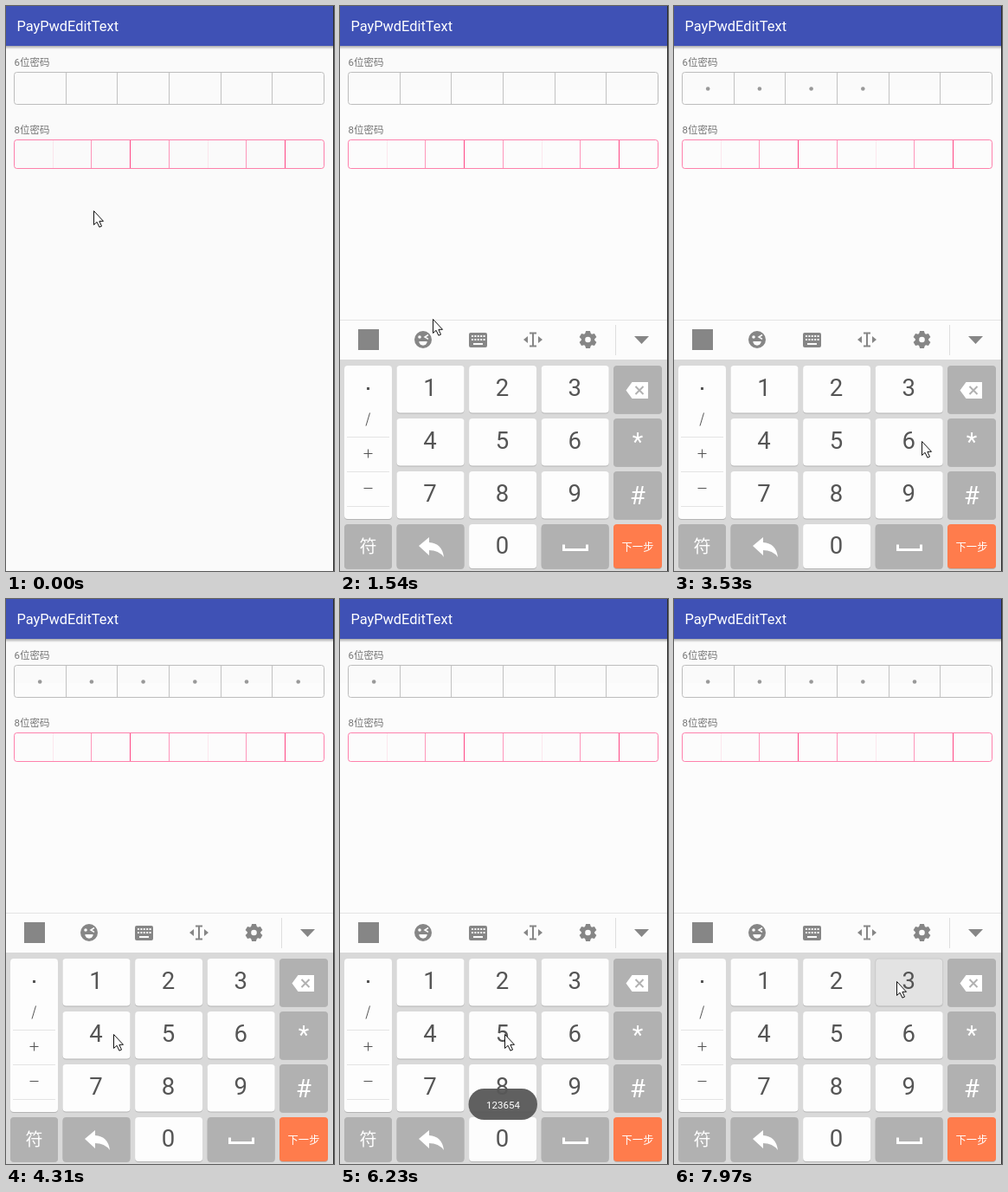
Recreate the animation shown at these times as an HTML page with a canvas. Size 379 by 652 pixels, loop 8 s.

```html
<!DOCTYPE html>
<html lang="zh">
<head>
<meta charset="utf-8">
<title>PayPwdEditText</title>
<style>
html, body { margin: 0; width: 100%; height: 100%; overflow: hidden; background: #fafafa; }
canvas { display: block; width: 379px; height: 652px; }
</style>
</head>
<body>
<canvas id="stage"></canvas>
<script>
const W = 379, H = 652, LOOP = 8000, HOLD = 60, KEYBOARD_IN = 1090;
const canvas = document.getElementById('stage');
const c = canvas.getContext('2d');
const dpr = window.devicePixelRatio || 1;
canvas.width = W * dpr;
canvas.height = H * dpr;

const FONT = 'Roboto, "Noto Sans CJK SC", "Noto Sans CJK", sans-serif';
const ICON = '#868686', PAPER = '#fcfcfc', GRAY = '#b1b1b1', WHITE = '#fdfdfd', INK = '#555';
const DELETE = '<';

const clamp = v => Math.max(0, Math.min(1, v));
const ramp = (t, a, b) => clamp((t - a) / (b - a));
const ease = p => p * p * (3 - 2 * p);

const colX = col => 65.5 + col * 83.6;
const rowY = row => 415 + row * 61;

// Centre of a key
function keyCentre(key) {
  if (key === DELETE) return [344, 441];
  const i = key - 1;
  return [colX(i % 3) + 38.5, rowY(Math.floor(i / 3)) + 26];
}

// Evenly paced runs of taps
const run = (start, gap, keys) => [...keys].map((key, i) => ({ key, time: start + i * gap }));
const taps = [
  ...run(2050, 280, '12'),
  ...run(3050, 400, '3654'),
  ...run(4880, 230, DELETE.repeat(5)),
  ...run(6560, 352, '52413')
];

// The hand drifts sideways from the key centres
const drift = t => 20 * Math.cos((t - 4250) / 1600);

const stops = [
  { x: 101, y: 236, leave: 150 },
  { x: 41, y: 98, leave: KEYBOARD_IN },
  { x: 107, y: 361, leave: 1570 },
  ...taps.map(({ key, time }) => {
    const [x, y] = keyCentre(key);
    return { x: x + drift(time), y, leave: time + HOLD };
  })
];

function pointerAt(t) {
  const next = stops.findIndex(s => t < s.leave);
  const to = stops[next < 0 ? stops.length - 1 : next];
  const from = next > 0 ? stops[next - 1] : to;
  const dx = to.x - from.x, dy = to.y - from.y;
  const travel = 120 + 1.1 * Math.hypot(dx, dy);
  const p = ease(ramp(t, from.leave, from.leave + travel));
  return [from.x + dx * p, from.y + dy * p];
}

const countAt = t => taps
  .filter(tap => t >= tap.time + HOLD)
  .reduce((n, tap) => n + (tap.key === DELETE ? -1 : 1), 0);

function heldAt(t) {
  const tap = taps.find(({ time }) => t >= time && t < time + HOLD);
  return tap ? tap.key : '';
}

function rect(x, y, w, h, fill) {
  c.fillStyle = fill;
  c.fillRect(x, y, w, h);
}

function round(x, y, w, h, r, fill) {
  c.beginPath();
  c.roundRect(x, y, w, h, r);
  if (fill) {
    c.fillStyle = fill;
    c.fill();
  }
}

function outline(color) {
  c.strokeStyle = color;
  c.lineWidth = 1;
  c.stroke();
}

function disc(x, y, r, fill, end = Math.PI * 2) {
  c.beginPath();
  c.arc(x, y, r, 0, end);
  c.fillStyle = fill;
  c.fill();
}

function shape(d, fill) {
  c.fillStyle = fill;
  c.fill(new Path2D(d));
}

function stroke(d, color, width) {
  c.strokeStyle = color;
  c.lineWidth = width;
  c.stroke(new Path2D(d));
}

function text(str, x, y, size, color, align = 'center') {
  c.font = `${size}px ${FONT}`;
  c.textAlign = align;
  c.fillStyle = color;
  c.fillText(str, x, y);
}

const pink = alpha => `rgba(255,64,129,${alpha})`;

function drawField(y, h, cells, border, divider) {
  for (let i = 1; i < cells; i++)
    rect(Math.floor(9.4 + i * 358 / cells), y + 1, 1, h - 1, divider(i));
  round(9.5, y + .5, 358, h, 3);
  outline(border);
}

function drawPage(t) {
  rect(0, 0, W, H, '#fafafa');
  if (t >= KEYBOARD_IN) rect(0, 97, W, H - 97, PAPER);
  const shadow = c.createLinearGradient(0, 46, 0, 50);
  shadow.addColorStop(0, 'rgba(0,0,0,.32)');
  shadow.addColorStop(1, 'rgba(0,0,0,0)');
  rect(0, 46, W, 4, shadow);
  rect(0, 0, W, 46, '#3f51b5');
  text('PayPwdEditText', 12.4, 29, 16.4, '#fff', 'left');

  text('6位密码', 9.5, 69, 11.5, '#757575', 'left');
  drawField(76, 37, 6, '#bdbdbd', () => '#c2c2c2');
  for (let i = 0; i < countAt(t); i++) disc(39.2 + i * 59.7, 95.5, 2.3, '#999');

  text('8位密码', 9.5, 147, 11.5, '#757575', 'left');
  drawField(154, 33, 8, pink(.65), i => pink(.54 - .43 * Math.sin(i * Math.PI / 2)));
}

function drawKey(x, y, w, h, fill, pressed) {
  round(x, y + 1, w, h, 4, '#b4b4b4');
  round(x, y, w, h, 4, fill);
  if (pressed) outline('#cacaca');
}

function drawToolbar() {
  rect(0, 362, W, 46, PAPER);
  rect(0, 362, W, 1, '#e4e4e4');
  rect(21, 373, 24, 24, ICON);

  disc(96, 385, 10, ICON);
  disc(92, 382, 1.8, PAPER);
  stroke('M102 379.5l-4 2.5 4 2.3', PAPER, 1.5);
  disc(96, 387, 4.7, PAPER, Math.PI);

  round(149, 377, 21, 17, 2, ICON);
  for (let i = 0; i < 10; i++)
    rect(152 + i % 5 * 3.4, 380 + Math.floor(i / 5) * 4, 2, 2, PAPER);
  rect(154, 389, 11, 2, PAPER);

  stroke('M219 377.5h8M219 392.5h8M223 377.5v15', ICON, 2);
  shape('M212 385l5-4v8zM234 385l-5-4v8z', ICON);

  for (let i = 0; i < 6; i++) {
    c.save();
    c.translate(286.5, 385);
    c.rotate(i * Math.PI / 3);
    shape('M-3.6-6L-2.4-10H2.4L3.6-6z', ICON);
    c.restore();
  }
  disc(286.5, 385, 7.7, ICON);
  disc(286.5, 385, 3.3, PAPER);

  rect(318, 368, 1, 35, '#dedede');
  shape('M340 381h17l-8.5 9z', ICON);
}

function drawDigit(n, x, y, h, held) {
  const down = held === n;
  drawKey(x, y, 78, h, down ? '#e3e3e3' : WHITE, down);
  text(n, x + 38.5, y + 35 - (54.5 - h) * .3, 27.5, INK);
}

function drawKeyboard(t) {
  const held = heldAt(t);
  rect(0, 408, W, 244, '#d9d9d9');
  drawToolbar();

  drawKey(5, 415, 55, 177, WHITE);
  for (let y = 497; y < 580; y += 40) rect(8, y, 49, 1, '#e4e4e4');
  rect(31, 440, 3, 3, INK);
  stroke('M34.5 469.5l-4.5 15M27.5 516.5h10M32.5 511.5v10M27.5 556.5h10', INK, 1);

  for (let i = 0; i < 9; i++)
    drawDigit(String(i + 1), colX(i % 3), rowY(Math.floor(i / 3)), 54.5, held);
  drawDigit('0', colX(1), 598, 51, held);

  for (let row = 0; row < 3; row++)
    drawKey(316, rowY(row), 56, 55, row === 0 && held === DELETE ? '#999' : GRAY);
  shape('M330.5 443.5l7-9.5H356v19h-18.5z', '#fff');
  stroke('M341.5 439l9 9M350.5 439l-9 9', GRAY, 2);
  text('*', 344, 513, 29, '#fff');
  text('#', 344, 575, 29, '#fff');

  drawKey(5, 598, 55, 51, GRAY);
  text('符', 32.5, 631, 20, '#fff');
  drawKey(colX(0), 598, 78, 51, GRAY);
  shape('M91 623L103 613V619Q118 620 120 636Q114 628 103 628V634Z', '#fff');
  drawKey(colX(2), 598, 78, 51, GRAY);
  stroke('M258.5 621.5v6h27v-6', '#fff', 3);
  drawKey(316, 598, 56, 51, '#ff7c4c');
  text('下一步', 344, 628.5, 12.3, '#fff');
}

function drawToast(t) {
  c.globalAlpha = ramp(t, 4370, 4780) * (1 - ramp(t, 6350, 6830));
  round(148.5, 565, 79.5, 36, 18, 'rgba(88,88,88,.95)');
  text('123654', 188.5, 588, 11.5, '#fff');
  c.globalAlpha = 1;
}

function drawPointer(t) {
  const [x, y] = pointerAt(t).map(Math.round);
  const arrow = 'M0 0V16L3.6 12.8L6.4 18.7L9 17.6L6.4 11.8H11Z';
  c.save();
  c.translate(x + .5, y + .5);
  shape(arrow, '#fff');
  stroke(arrow, '#111', 1);
  c.restore();
}

function frame() {
  const t = performance.now() % LOOP;
  c.setTransform(dpr, 0, 0, dpr, 0, 0);
  drawPage(t);
  if (t >= KEYBOARD_IN) {
    const rest = 1 - ramp(t, KEYBOARD_IN, KEYBOARD_IN + 240);
    c.save();
    c.translate(0, Math.round(290 * rest * rest));
    drawKeyboard(t);
    c.restore();
  }
  drawToast(t);
  rect(378, 0, 1, H, '#2b2b2b');
  drawPointer(t);
  requestAnimationFrame(frame);
}
frame();
</script>
</body>
</html>
```
